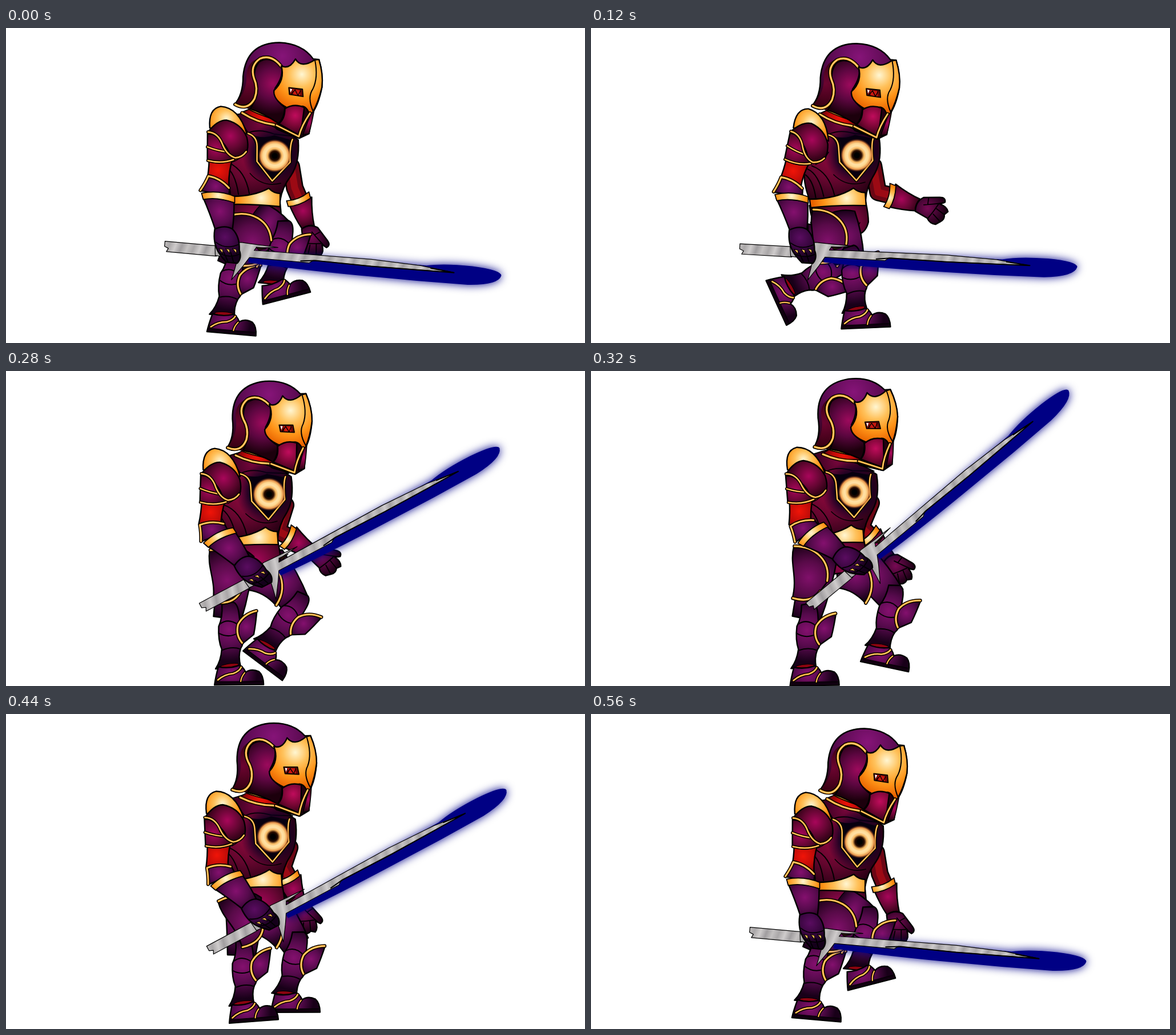
These frames come from a looping animation (1014x552 px, 0.6 s). An HTML page with a canvas:

```html
<!DOCTYPE html>
<html lang="en">
<head>
<meta charset="utf-8">
<title>Walking knight</title>
<style>
html, body { margin: 0; width: 100%; height: 100%; overflow: hidden; background: #fff; }
canvas { display: block; }
</style>
</head>
<body>
<canvas id="stage" width="1014" height="552"></canvas>
<script>
const ctx = document.getElementById('stage').getContext('2d');
const LOOP = 600, STEP = 40, CYCLE = 560;
const RAD = Math.PI / 180;
let phase = 0;

// Periodic motion: a mean plus cosine and sine amounts for each harmonic.
const wave = (mean, ...amps) => amps.reduce((sum, a, i) => {
  const angle = ((i >> 1) + 1) * phase;
  return sum + a * (i % 2 ? Math.sin(angle) : Math.cos(angle));
}, mean);

// A joint is a position with an angle in degrees; children hang from it.
const joint = (x, y, deg = 0) => ({ x, y, deg });
function child(p, dx, dy, deg = p.deg) {
  const c = Math.cos(p.deg * RAD), s = Math.sin(p.deg * RAD);
  return joint(p.x + dx * c - dy * s, p.y + dx * s + dy * c, deg);
}

function legRig(hip, foot, shinDeg) {
  const ankle = child(foot, -18, -20, shinDeg);
  const shin = child(ankle, 17, -85);
  return { hip, foot, shin, knee: child(shin, -16, -2) };
}

function rig() {
  const torso = joint(wave(466.6, 5, -1), wave(220, 4, 5, 1, -2), wave(-3.2, 2.2, 0, 1.4));
  const head = joint(wave(497, 8, -3, 2.3, .7), wave(107, 5.6, 8.8, .7, -3), wave(-4, 3.2, 3.7, .5, -1.4));

  const upperArm = child(torso, -84, -30, wave(3, -.7, 9, -2, -3.8));
  const foreArm = child(upperArm, -13, 73, wave(-19.2, 16.6, 18.6, 2.5, -5.5));
  const farElbow = joint(torso.x + wave(24, 10, 10), torso.y + wave(59, -4, 6), wave(-26.5, 19.8, -27.8, 7.4, 7));

  const nearHip = joint(torso.x + wave(-47, 13, 10), torso.y + 110);
  const farHip = joint(torso.x + wave(-24, -22, -21), torso.y + 118);
  const nearFoot = joint(wave(448, 40, 29, 0, -10), wave(513, -38, -5, -15, -4), wave(-4.5, -7, 1, -3));
  const farFoot = joint(wave(428, -31, -98, -1, 24.6), wave(497.5, 17, -19, 16, -2.6, -8.7, -4.2), wave(29, -16, 39, -8, -12));
  return {
    torso, head, upperArm, foreArm, farElbow,
    near: legRig(nearHip, nearFoot, wave(-1, 6, -4.4, 5, 4)),
    far: legRig(farHip, farFoot, wave(32, -13, 33, -10, -12)),
    tasset: child(nearHip, -8, -8, wave(-2, -5, 9, 2, 13)),
    skirt: child(farHip, -9, 14, 5),
  };
}

// Draws a part at its joint; (ox, oy) is the joint in the part's own drawing.
function part(p, ox, oy, draw) {
  ctx.save();
  ctx.translate(p.x, p.y);
  ctx.rotate(p.deg * RAD);
  ctx.translate(-ox, -oy);
  draw();
  ctx.restore();
}

const glow = (x, y, r, ...colors) => {
  const g = ctx.createRadialGradient(x, y, 0, x, y, r);
  colors.forEach((c, i) => g.addColorStop(i / (colors.length - 1), c));
  return g;
};
const purple = (x, y, r) => glow(x, y, r, '#84106e', '#560a4c', '#180018');
const wine = (x, y, r) => glow(x, y, r, '#a8065a', '#640632', '#1c000a');
const red = (x, y, r) => glow(x, y, r, '#f01408', '#c00c08', '#5a0008');
const amber = (x, y, r) => glow(x, y, r, '#fff6d2', '#ffc25c', '#ff9418', '#e86200');

function shape(d, fill, w = 2.4) {
  const p = new Path2D(d);
  ctx.fillStyle = fill;
  ctx.fill(p);
  if (w) { ctx.lineWidth = w; ctx.strokeStyle = '#000'; ctx.stroke(p); }
}
function line(d, w = 2, color = '#000') {
  ctx.lineWidth = w;
  ctx.strokeStyle = color;
  ctx.stroke(new Path2D(d));
}
function trim(d, w = 3.4) {
  line(d, w + 3);
  line(d, w, '#ff9d1c');
  line(d, w * .4, '#ffdc90');
}

function thigh({ hip, knee }) {
  const dx = knee.x - hip.x, dy = knee.y - hip.y;
  ctx.save();
  ctx.translate(hip.x, hip.y);
  ctx.rotate(Math.atan2(dy, dx) - Math.PI / 2);
  ctx.scale(1, Math.hypot(dx, dy) / 100);
  shape('M-32,-8Q0,-28 32,-6Q34,50 25,104L-24,104Q-26,50 -32,-8Z', purple(0, 45, 62));
  ctx.restore();
}

function shin() {
  shape('M-25,-22Q-24,0 -32,16Q-34,40 -28,56Q-30,76 -40,90L4,87Q0,70 5,56Q12,46 8,40L4,-8Q2,-24 -6,-26Z', purple(-14, 22, 56));
  shape('M-30,85Q-15,80 0,82L0,87L-33,89Z', '#8c0410', 1);
  line('M-30,12Q-15,1 2,14M-32,28Q-15,38 3,28M-28,58Q-10,51 5,57');
  shape('M0,14Q12,-4 36,-10Q33,14 29,32L8,48Q-3,30 0,14Z', purple(16, 18, 34));
  trim('M35,-9Q12,-4 2,14Q-3,32 8,46');
}

function foot() {
  shape('M-36,-18Q-41,0 -43,14L43,14Q43,-2 35,-9Q22,-15 12,-8Q6,-20 0,-20Q-18,-14 -36,-18Z', purple(-12, -6, 44));
  shape('M-43,14L-42,8L42,8L43,14Z', '#10000f', 1);
  trim('M-37,5Q-25,-5 -10,-6Q1,-10 4,-17', 2.8);
  trim('M10,-7Q4,0 3,8', 2.2);
}

function leg(l) {
  thigh(l);
  part(l.shin, 0, 0, shin);
  part(l.foot, 0, 0, foot);
}

function skirt() {
  shape('M-30,-10L27,-6Q40,22 36,40L28,60Q5,38 -23,37Z', purple(6, 12, 46));
  trim('M27,0Q44,30 28,59');
}

function tasset() {
  shape('M-37,-2C-40,30 -20,50 -24,90Q10,92 22,68L31,50C31,12 0,-8 -37,-2Z', glow(-2, 48, 58, '#80106a', '#580a48', '#1c0018'));
  trim('M-36,-2C0,-8 31,12 31,48');
  trim('M-23,88Q10,92 22,68');
}

function pelvis() {
  shape('M382,306L481,308Q484,330 483,342Q478,358 466,362L410,365Q384,350 382,306Z', wine(440, 340, 66));
  line('M466,362Q462,350 468,342', 1.6);
}

function chest() {
  shape('M404,152Q380,200 379,240Q372,262 384,300L481,302Q484,280 500,258Q515,235 512,196L470,165Z', glow(428, 222, 88, '#90083c', '#64062e', '#240012'));
  shape('M404,152L430,146L508,190L470,186Q445,176 424,184Z', glow(445, 168, 50, '#74063a', '#2c001c'), 1.8);
  line('M383,242Q402,252 408,292M391,237Q420,250 427,291M379,252Q392,264 394,294');
  line('M398,235Q412,230 422,215M428,255Q450,280 482,272', 1.6);
  ctx.fillStyle = glow(466, 222, 52, '#050010', '#08001c', 'rgba(16,0,40,0)');
  ctx.fillRect(412, 170, 98, 104);
  shape('M424,185Q450,196 470,188Q490,194 502,196L499,236L467,269L440,234Q442,200 424,185Z', '#07000f', 0);
  trim('M424,185Q440,190 440,208L440,234L467,268L498,235Q497,205 502,195', 2.6);
  ctx.fillStyle = glow(471, 224, 29, '#000', '#000', '#2a0c00', '#f8b860', '#ffe2a8', '#ffd890', '#e8964a', 'rgba(120,40,10,0)');
  ctx.fillRect(442, 195, 58, 58);
  shape('M383,295Q430,298 461,281Q470,290 481,290L481,313Q430,308 384,310Z', amber(448, 298, 60));
}

function farShoulder(torso, elbow) {
  const cuff = child(elbow, 7, 16);
  const path = `M${torso.x + 28},${torso.y + 18}L${elbow.x},${elbow.y}L${cuff.x},${cuff.y}`;
  line(path, 31);
  line(path, 26, '#6c0614');
  line(path, 12, '#9c0a14');
}

function farArm() {
  shape('M498,308L538,296Q538,325 543,346Q530,344 522,352Q510,335 498,308Z', wine(523, 320, 36));
  shape('M521,352Q535,342 549,349L566,371Q573,380 565,384L557,379Q561,391 555,398L547,396Q541,402 533,398L524,394Q519,385 524,376Z', glow(538, 366, 32, '#780a54', '#4a0636', '#1c0014'));
  line('M524,377Q540,378 555,377M536,380L533,396M547,379L547,396M539,357Q552,372 563,383M544,362L553,357', 1.8);
  shape('M494,303Q515,302 533,287L536,298Q516,312 497,313Z', amber(512, 302, 28), 1.8);
}

function helmet() {
  shape('M400,135Q416,118 416,85Q422,26 480,26Q520,28 539,55L549,56Q556,80 554,105Q548,135 537,150L531,186L514,194L475,178Q440,138 400,135Z', glow(485, 50, 105, '#861478', '#5a0a50', '#240010'));
  // neck guard
  shape('M413,148L430,141L484,166L470,174Z', red(450, 155, 36), 1.8);
  trim('M429,142Q448,152 484,163', 3);
  trim('M414,149Q440,166 470,170L512,191', 3.4);
  // ear
  shape('M401,134Q420,116 422,90Q420,60 445,53L440,110L428,142Z', glow(425, 95, 50, '#6c0430', '#2c000c'), 0);
  shape('M428,142Q442,122 440,104Q430,78 444,60Q462,48 483,68Q488,84 472,106Q468,124 489,140Q488,158 478,168Q452,150 428,142Z', glow(468, 98, 54, '#9c0a5c', '#5c0640', '#1c000c'));
  trim('M402,134Q424,146 436,124Q443,106 435,88Q428,66 446,54Q466,46 483,68', 3.6);
  // visor
  shape('M483,67Q497,74 508,55Q518,72 541,57L549,56Q557,82 554,105Q548,130 538,148L533,158Q530,140 520,138L492,140Q468,126 470,110Q490,92 483,67Z', amber(519, 82, 64));
  line('M542,57Q548,88 538,108Q528,122 538,146', 2);
  // cheek and chin
  shape('M489,142Q505,132 523,140L516,190L478,168Q489,160 489,142Z', glow(507, 154, 38, '#c00c5c', '#780634', '#240010'));
  shape('M534,152L540,146Q536,168 531,186L520,188Z', wine(531, 166, 24), 1.6);
  trim('M474,171L513,191Q518,172 533,150', 3);
  // eye
  shape('M496,105L520,108L521,121L497,117Z', '#6c0806', 1.8);
  shape('M498,107L502,108L499,114Z', '#fff', 0);
  shape('M503,108L515,110L516,119L504,117Z', '#c81810', 0);
  line('M500,117L507,109L512,119L517,110', 1.4);
}

function pauldron() {
  shape('M356,232L398,228Q390,250 391,276L352,272Q356,250 356,232Z', red(372, 250, 38));
  shape('M353,186L390,190L400,232Q374,242 353,233Z', wine(368, 212, 40));
  trim('M354,233Q378,239 399,231', 2.6);
  trim('M353,209Q370,216 390,218', 2.6);
  shape('M357,176Q354,142 376,138Q408,140 422,186L405,182Z', amber(386, 160, 44));
  shape('M354,183Q370,162 386,162Q412,168 422,192Q428,218 414,226Q402,230 394,226Q384,196 354,183Z', wine(393, 190, 42));
  trim('M354,183Q372,184 380,206Q388,224 402,228Q414,227 421,217', 2.8);
}

function gauntlet() {
  shape('M355,258Q378,264 392,283L391,294L341,286Q350,272 355,258Z', purple(368, 278, 32));
  trim('M341,285Q350,272 355,260Q376,264 391,281', 3.2);
  shape('M345,296L400,304Q400,332 397,354L367,354Q358,326 345,296Z', purple(375, 322, 44));
  shape('M343,290Q374,284 401,296L401,307Q370,296 346,301Z', amber(372, 294, 40), 1.8);
}

function blade() {
  ctx.shadowColor = '#000088';
  ctx.shadowBlur = 16;
  shape('M148,4L260,-5L460,-8Q490,-15 540,-14Q592,-12 592,-2Q588,15 535,19Q450,21 365,20Q240,20 149,15Z', '#000084', 0);
  ctx.shadowBlur = 0;
  const steel = ctx.createLinearGradient(0, -12, 500, 130);
  const greys = ['#c4c1c1', '#aaa7a8', '#cfcccc', '#a09d9f'];
  for (let i = 0; i <= 50; i++) steel.addColorStop(i / 50, greys[i % greys.length]);
  shape('M0,-9L90,-9L92,9L4,9L7,3L0,0Z', steel, 1.2);
  shape('M88,-9L133,-19L150,-18L198,-16L160,-12L157,-7L198,-8L363,-10L450,-7L509,0L363,2L262,1L255,6L150,6L140,22L122,48Q126,30 128,18L120,10L90,8Z', steel, 1.2);
  line('M240,4L265,1L363,2L450,1L509,0L468,-4', 2);
  shape('M160,-13L178,-12L165,-8Z', '#241008', 1);
}

function hand() {
  shape('M366,353Q384,345 397,353Q410,366 409,390Q414,404 405,413L386,411Q378,402 374,396Q362,378 366,353Z', glow(384, 367, 38, '#5a0c60', '#3a0640', '#14001a'));
  line('M368,376Q385,390 408,380M382,394L389,410M394,394L399,412M374,395Q390,405 410,397', 1.8);
  for (let i = 0; i < 3; i++) shape(`M${373 + i * 12},387l7,2v7Z`, '#ffc050', 1);
}

function swordArm() {
  gauntlet();
  part(joint(278, 383, 5.3), 0, 0, blade);
  hand();
}

function draw(t) {
  phase = t / CYCLE * 2 * Math.PI;
  const r = rig();
  ctx.fillStyle = '#fff';
  ctx.fillRect(0, 0, 1014, 552);
  ctx.lineJoin = 'round';
  ctx.lineCap = 'round';

  farShoulder(r.torso, r.farElbow);
  part(r.farElbow, 508, 280, farArm);
  leg(r.far);
  part(r.skirt, 0, 0, skirt);
  part(r.torso, 472, 225, pelvis);
  leg(r.near);
  part(r.tasset, 0, 0, tasset);
  part(r.torso, 472, 225, chest);
  part(r.head, 508, 114, helmet);
  part(r.upperArm, 388, 195, pauldron);
  part(r.foreArm, 375, 268, swordArm);
}

const start = performance.now();
function tick(now) {
  const t = Math.max(0, now - start) % LOOP;
  draw(Math.floor(t / STEP) * STEP);
  requestAnimationFrame(tick);
}
requestAnimationFrame(tick);
</script>
</body>
</html>
```
